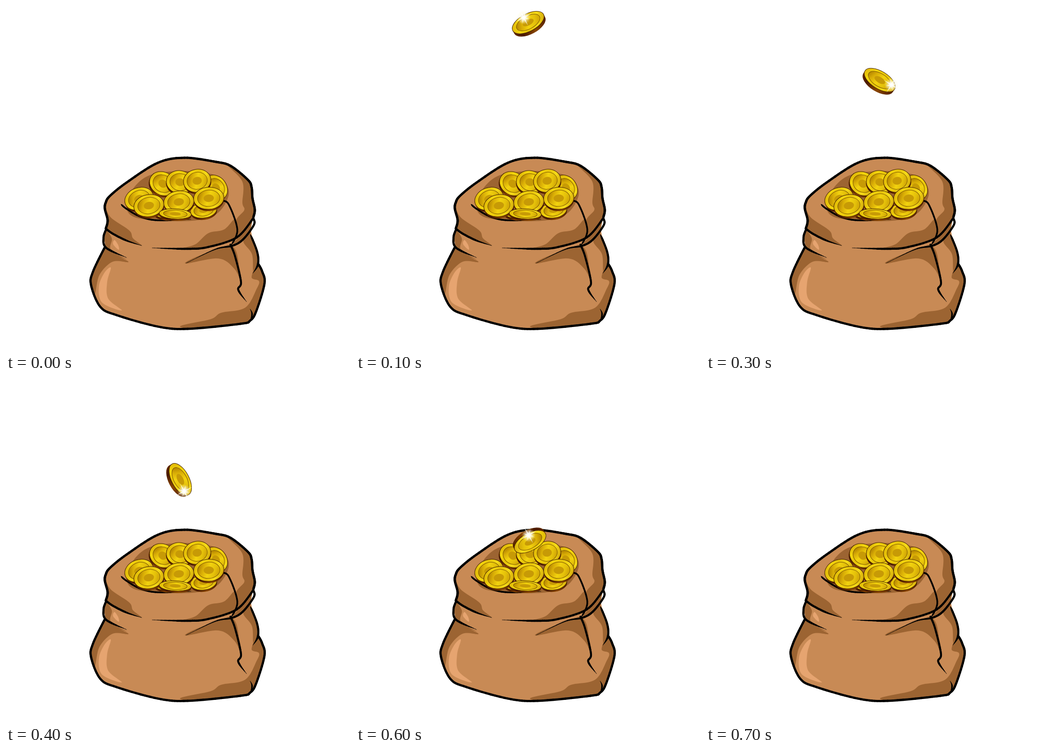
Recreate the animation shown at these times as an HTML page with a canvas. Size 748x748 px, loop 800 ms.

```html
<!DOCTYPE html>
<html lang="en">
<head>
<meta charset="utf-8">
<title>Coin sack</title>
<style>
html, body { margin: 0; width: 100%; height: 100%; overflow: hidden; background: #fff; }
canvas { display: block; width: 100vw; height: 100vh; }
</style>
</head>
<body>
<canvas id="stage" width="748" height="748"></canvas>
<script>
const ctx = document.getElementById('stage').getContext('2d');
const SIZE = 748, STEP = 100, LOOP = 800, TAU = Math.PI * 2;
const CLOTH = '#c88a55', SHADE = '#9c6432', LIGHT = '#e6a470', INK = '#000';

// Catmull-Rom curve through "x,y x,y ..." as a dense polyline
function curve(text, closed) {
  const p = text.trim().split(/\s+/).map(s => s.split(',').map(Number));
  const n = p.length, out = [];
  const at = i => closed ? p[(i + n) % n] : p[Math.max(0, Math.min(n - 1, i))];
  for (let i = 0; i < (closed ? n : n - 1); i++) {
    const [a, b, c, d] = [at(i - 1), at(i), at(i + 1), at(i + 2)];
    for (let t = 0; t < 0.99; t += 0.1) {
      out.push([0, 1].map(j => b[j] + 0.5 * t * (c[j] - a[j] +
        t * (2 * a[j] - 5 * b[j] + 4 * c[j] - d[j] + t * (3 * (b[j] - c[j]) + d[j] - a[j])))));
    }
  }
  if (!closed) out.push(p[n - 1]);
  return out;
}

function blob(text) {
  const path = new Path2D();
  curve(text, true).forEach(([x, y]) => path.lineTo(x, y));
  path.closePath();
  return path;
}

function fill(color, text) {
  ctx.fillStyle = color;
  ctx.fill(blob(text));
}

// Ink line; head and tail are the shares of the line that taper
function ink(text, width = 4.5, head = 0, tail = 0) {
  const p = curve(text), n = p.length - 1;
  ctx.strokeStyle = INK;
  ctx.lineCap = 'round';
  for (let i = 0; i < n; i++) {
    const t = (i + 0.5) / n;
    const thin = Math.min(1, head ? t / head : 1, tail ? (1 - t) / tail : 1);
    ctx.lineWidth = Math.max(0.8, width * thin);
    ctx.beginPath();
    ctx.moveTo(...p[i]);
    ctx.lineTo(...p[i + 1]);
    ctx.stroke();
  }
}

// Clockwise parts of the silhouette
const TOP = '217,484 221,466 215,441 217,427 226,413 262,384 330,341 388,330 457,339 489,348 526,378 534,394 536,418 541,443 538,459';
const RIGHT = '533,490 546,534 548,561';
const BODY = '548,560 557,577 562,604 544,664 531,684 510,691 395,702 330,697 240,672 205,654 185,607 189,578 214,526';
const LEFT = '212,502 217,487';

function shading() {
  // lower body
  fill(SHADE, '206,522 248,546 266,557 232,556 203,585 192,630 180,600');
  fill(LIGHT, '228,569 214,580 202,610 209,645 252,662 222,636 220,600');
  fill(SHADE, '378,697 445,681 468,667 520,656 545,615 550,598 534,590 548,562 572,590 540,692 450,706');
  fill(SHADE, '390,560 425,541 491,522 508,572 511,600 497,572 462,549');
  fill(SHADE, '516,512 530,494 551,558 538,578 535,540');
  // middle fold
  fill(SHADE, '214,486 230,505 228,530 262,551 214,530 207,508');
  fill(LIGHT, '236,509 233,518 245,530 244,520');
  fill(SHADE, '497,512 540,468 522,504 462,528');
  // upper roll
  fill(SHADE, '214,436 228,460 268,488 276,505 294,521 236,498 214,482');
  fill(SHADE, '384,527 412,518 440,494 474,486 497,464 503,482 498,504 440,525');
  fill(SHADE, '480,344 514,382 514,428 518,444 500,467 500,508 546,455 541,410 508,352');
  // around the coins
  fill(SHADE, '318,366 282,390 262,430 282,460 380,468 452,456 484,412 470,376 430,362 380,359');
}

function bag() {
  const sack = blob([TOP, RIGHT, BODY, LEFT].join(' '));
  ctx.fillStyle = CLOTH;
  ctx.fill(sack);
  ctx.save();
  ctx.clip(sack);
  shading();
  ctx.restore();

  ink(TOP, 5);
  ink(BODY, 4.8);
  ink('531,496 546,534 548,561 537,581', 4.5, 0.1, 0.3);
  ink('531,659 535,669 533,683', 3, 0.5);
  ink('217,487 212,504 218,526 262,547', 4.5, 0, 0.25);
  ink('538,462 539,476 516,507 493,521 455,529 392,559', 4.5, 0, 0.4);
  ink('217,484 232,495 262,510 295,521', 4.5, 0, 0.4);
  ink('318,526 395,528 440,524 502,503 538,461', 4.5, 0.2);
  ink('468,424 484,431 503,486 490,520', 3.6, 0.15, 0.1);
  ink('488,519 498,544 511,600 505,617 523,643', 4.2, 0, 0.2);
  ink('250,431 262,441 292,458 330,466 402,464', 3.6, 0.1, 0.2);
}

function oval(x, y, rx, ry) {
  ctx.beginPath();
  ctx.ellipse(x, y, rx, ry, 0, 0, TAU);
}

function shine(r, ...colors) {
  const g = ctx.createLinearGradient(-r, -r * 0.4, r, r * 0.4);
  colors.forEach((c, i) => g.addColorStop(i / (colors.length - 1), c));
  return g;
}

// Coin whose rim shows along local +y; an optional glint runs around its face
function coin(x, y, tilt, rx = 32, ry = 24, thick = 4, glint = null) {
  ctx.save();
  ctx.translate(x, y);
  ctx.rotate(tilt * TAU / 360);
  ctx.lineWidth = 1;
  ctx.strokeStyle = '#3e1c00';
  oval(0, thick / 2, rx, ry);
  ctx.rect(-rx, -thick / 2, 2 * rx, thick);
  ctx.fillStyle = shine(rx, '#6b2e00', '#4a1900', '#8a4600', '#4d1b00');
  ctx.fill();
  ctx.translate(0, -thick / 2);
  oval(0, 0, rx, ry);
  ctx.fillStyle = shine(rx, '#d8ad05', '#f4d60d', '#e6c20a', '#f7dc18', '#c89a05');
  ctx.fill();
  ctx.stroke();
  oval(0, 0, rx * 0.74, ry * 0.74);
  ctx.fillStyle = shine(rx * 0.74, '#a87800', '#d8ac06', '#f2d20e', '#e4c00a', '#c89a05');
  ctx.fill();
  ctx.strokeStyle = '#7c5600';
  ctx.stroke();
  oval(0, 0, rx * 0.34, ry * 0.34);
  ctx.fillStyle = '#c79a06';
  ctx.fill();
  if (glint !== null) {
    const a = glint * TAU / 360;
    sparkle(rx * 0.75 * Math.cos(a), ry * 0.75 * Math.sin(a));
  }
  ctx.restore();
}

function sparkle(x, y) {
  ctx.translate(x, y);
  const g = ctx.createRadialGradient(0, 0, 0, 0, 0, 15);
  g.addColorStop(0, '#fff');
  g.addColorStop(0.3, 'rgba(255,255,245,.85)');
  g.addColorStop(1, 'rgba(255,245,200,0)');
  ctx.fillStyle = g;
  oval(0, 0, 15, 15);
  ctx.fill();
  ctx.fillStyle = 'rgba(255,255,255,.85)';
  for (let i = 0; i < 8; i++) {
    ctx.beginPath();
    ctx.moveTo(0, -1.6);
    ctx.lineTo(i % 2 ? 13 : 20, 0);
    ctx.lineTo(0, 1.6);
    ctx.fill();
    ctx.rotate(TAU / 8);
  }
}

function pile() {
  coin(430, 446, -8, 29, 17);
  coin(345, 456, 8, 22, 8);
  coin(455, 396, 55, 29, 23);
  for (let i = 0; i < 3; i++) coin(340 + 38 * i, 388 - 3 * i, 30 - 20 * i, 30, 25);
  coin(290, 421, -20);
  for (let i = 0; i < 3; i++) coin(311 + 65 * i, 436 - 8 * i, 3 * i - 10, 33);
  coin(368, 454, 3, 35, 11);
}

// Key poses of the falling coin, one per step: x, y, tilt
const FALL = [
  [376, 39, -28], [376, 112, 4], [376, 164, 32],
  [376, 222, 62], [384, 294, 126], [377, 353, 151]
];

let shown = -1;
function draw(now) {
  const step = Math.floor((now % LOOP) / STEP);
  if (step === shown) return;
  shown = step;
  ctx.fillStyle = '#fff';
  ctx.fillRect(0, 0, SIZE, SIZE);
  bag();
  pile();
  const k = step - 1, pose = FALL[k];
  if (pose) coin(...pose, 38, 19, 7, 39 * k - 97);
}

const start = performance.now();
function tick() {
  draw(performance.now() - start);
  requestAnimationFrame(tick);
}
tick();
</script>
</body>
</html>
```
